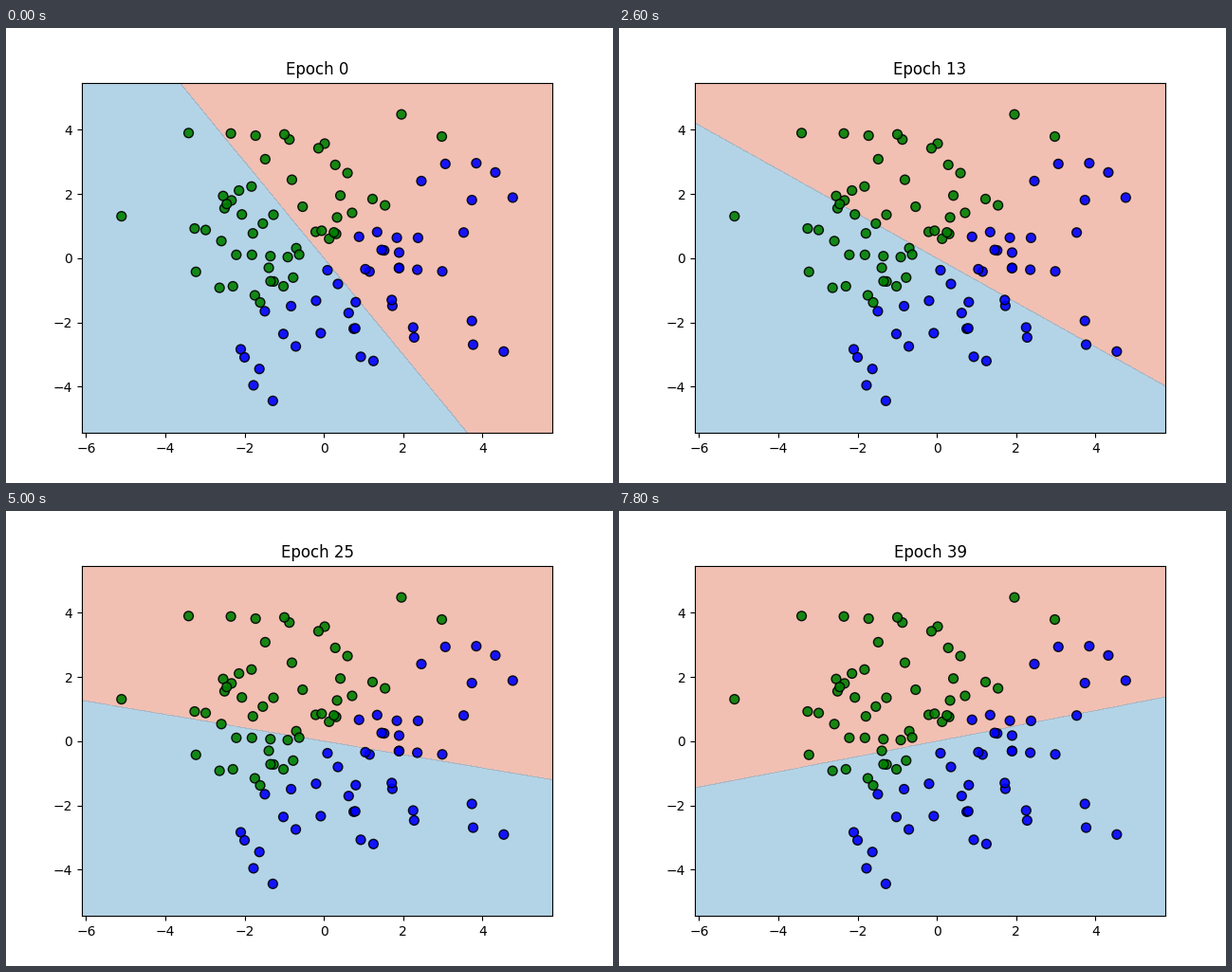
Recreate the animation shown at these times as a matplotlib script. Size 640 by 480 pixels, loop 8000 ms.

```python
import numpy as np
import matplotlib.pyplot as plt
from matplotlib.animation import FuncAnimation

EPOCHS = 40
STEP = 0.01

# Two classes split by the diagonal y = x.
rng = np.random.RandomState(0)
points = 2 * rng.randn(100, 2)
x, y = points.T
colors = np.where(x > y, "blue", "green")

# The boundary turns about the origin; its angle is a smooth curve in time.
KEY_EPOCHS = [0, 8, 13, 20, 25, 33, 39]
KEY_SLOPES = [-1.503, -0.954, -0.690, -0.392, -0.2085, 0.055, 0.2385]
angle = np.poly1d(np.polyfit(KEY_EPOCHS, np.arctan(KEY_SLOPES), 4))

grid_x = np.arange(x.min() - 1, x.max() + 1, STEP)
grid_y = np.arange(y.min() - 1, y.max() + 1, STEP)

fig, ax = plt.subplots(figsize=(6.4, 4.8), dpi=100)
ax.set_xlim(grid_x[0], grid_x[-1])
ax.set_ylim(grid_y[0], grid_y[-1])
title = ax.set_title("Epoch 0")
ax.scatter(x, y, s=50, c=colors, edgecolors="black", linewidths=1,
           alpha=0.9, zorder=2)
regions = None


def update(epoch):
    global regions
    if regions is not None:
        regions.remove()
    line = np.tan(angle(epoch)) * grid_x
    side = np.where(grid_y[:, None] < line, 1, -1)
    regions = ax.contourf(grid_x, grid_y, side, levels=[-1, 0, 1],
                          cmap="RdBu", alpha=0.5, zorder=1)
    title.set_text(f"Epoch {epoch}")
    return [title]


anim = FuncAnimation(fig, update, frames=EPOCHS, interval=200,
                     init_func=lambda: update(0), repeat=True, blit=False)
plt.show()
```
